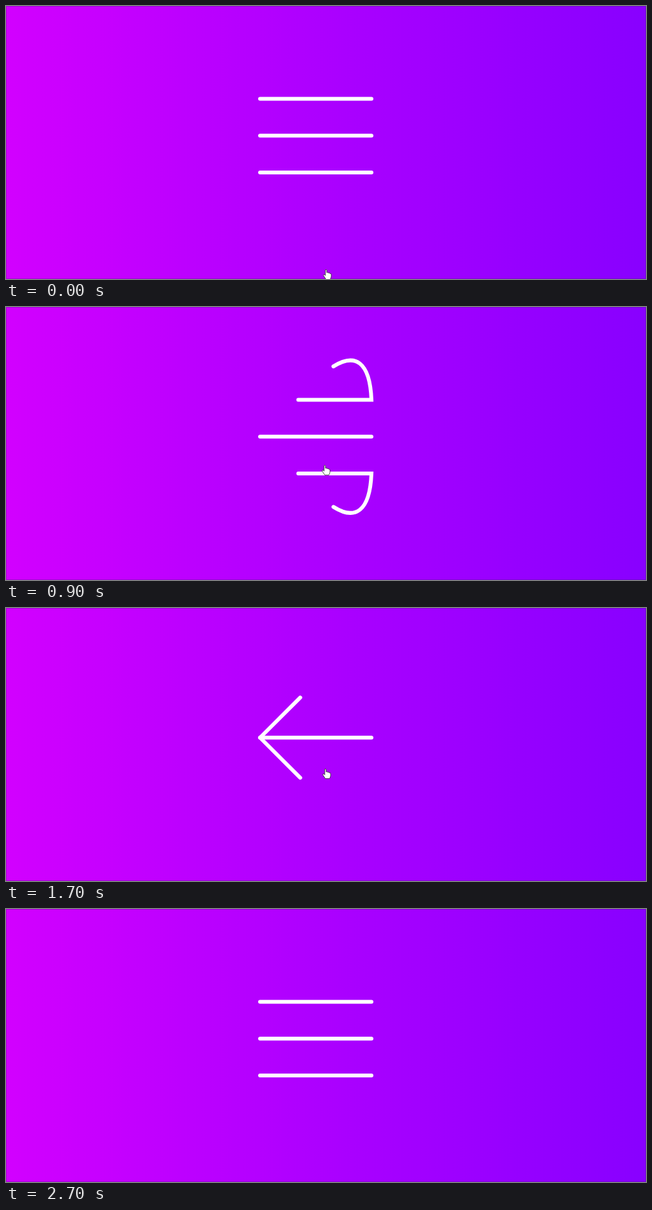
Write an HTML page that moves like this. It is 1000 px wide and 428 px high and loops after 3.5 s.

```html
<!DOCTYPE html>
<html lang="en">
<head>
<meta charset="utf-8">
<title>Menu to arrow</title>
<style>
  html, body { margin: 0; width: 100%; height: 100%; overflow: hidden; }
  body {
    background: linear-gradient(90deg, #d200ff, #ac00ff 50%, #8800ff);
    box-shadow: inset 0 0 0 1px rgba(70, 30, 120, .35);
  }
  svg { display: block; width: 1000px; height: 428px; }
  .line { fill: none; stroke: #fff; stroke-width: 6; stroke-linecap: round; }
  .cursor { fill: #fff; stroke: #222; stroke-width: .8; stroke-linejoin: round; }
</style>
</head>
<body>
<svg viewBox="0 0 1000 428">
  <path id="bar" class="line" d="M397 145.5H571C568 70 532 68 484 116L397 203.25"/>
  <path class="line" d="M397 203.25H571"/>
  <use href="#bar" transform="matrix(1 0 0 -1 0 406.5)"/>
  <g class="cursor">
    <path id="hand" d="M-1 1Q0 -1 1.2 1V5Q2.5 4 3.8 5.5Q5 4.8 6 6.2Q8 5.8 8.2 8V11Q8 13 6.5 15.5H0L-4 9.5Q-4.5 7.5 -2.5 8L-1 9.5Z"/>
    <path id="arrow" d="M0 0V12.5L3 9.8L5 14.3L7 13.4L5 9.2H9Z"/>
  </g>
</svg>
<script>
const LOOP = 3500, STEP = 100, END = 2700;
const HEAD = 89;    // arrowhead arm at rest
const BAR = 174;    // menu bar at rest
const DASH = 220;
const [bar, hand, arrow] = ['bar', 'hand', 'arrow'].map(id => document.getElementById(id));
const travel = bar.getTotalLength() - HEAD + DASH - BAR;
bar.style.strokeDasharray = `${DASH} 2000`;

// pointer tip: time, x, y
const track = [
  [0, 500, 413], [300, 474, 265], [500, 498, 247], [1000, 498, 248], [1300, 499, 375],
  [1400, 499, 370], [1700, 499, 252], [1900, 498, 198], [2300, 498, 200], [2600, 500, 400]
];

const bezier = (a, b, u) => 3 * (1 - u) ** 2 * u * a + 3 * (1 - u) * u * u * b + u ** 3;

// cubic-bezier(.25, -.5, .75, 1.5)
function ease(x) {
  if (x <= 0) return 0;
  if (x >= 1) return 1;
  let lo = 0, hi = 1;
  for (let i = 0; i < 24; i++) {
    const mid = (lo + hi) / 2;
    if (bezier(.25, .75, mid) < x) lo = mid; else hi = mid;
  }
  return bezier(-.5, 1.5, lo);
}

function pointerAt(t) {
  const i = track.findIndex(k => k[0] > t);
  if (i < 0) return track[track.length - 1].slice(1);
  const [t0, x0, y0] = track[i - 1], [t1, x1, y1] = track[i];
  const p = (t - t0) / (t1 - t0);
  return [x0 + (x1 - x0) * p, y0 + (y1 - y0) * p];
}

function draw(t) {
  const p = ease((t - 642) / 677) - ease((t - 2100) / 600);
  bar.style.strokeDashoffset = DASH - BAR - travel * p;

  const [x, y] = pointerAt(t);
  const away = t > 1000 && y > 340;
  for (const [shape, on] of [[hand, !away], [arrow, away]]) {
    shape.setAttribute('transform', `translate(${x} ${y})`);
    shape.style.display = on && t < END ? '' : 'none';
  }
}

function tick() {
  const t = performance.now() % LOOP;
  draw(Math.min(END, Math.floor(t / STEP) * STEP));
  requestAnimationFrame(tick);
}
tick();
</script>
</body>
</html>
```
